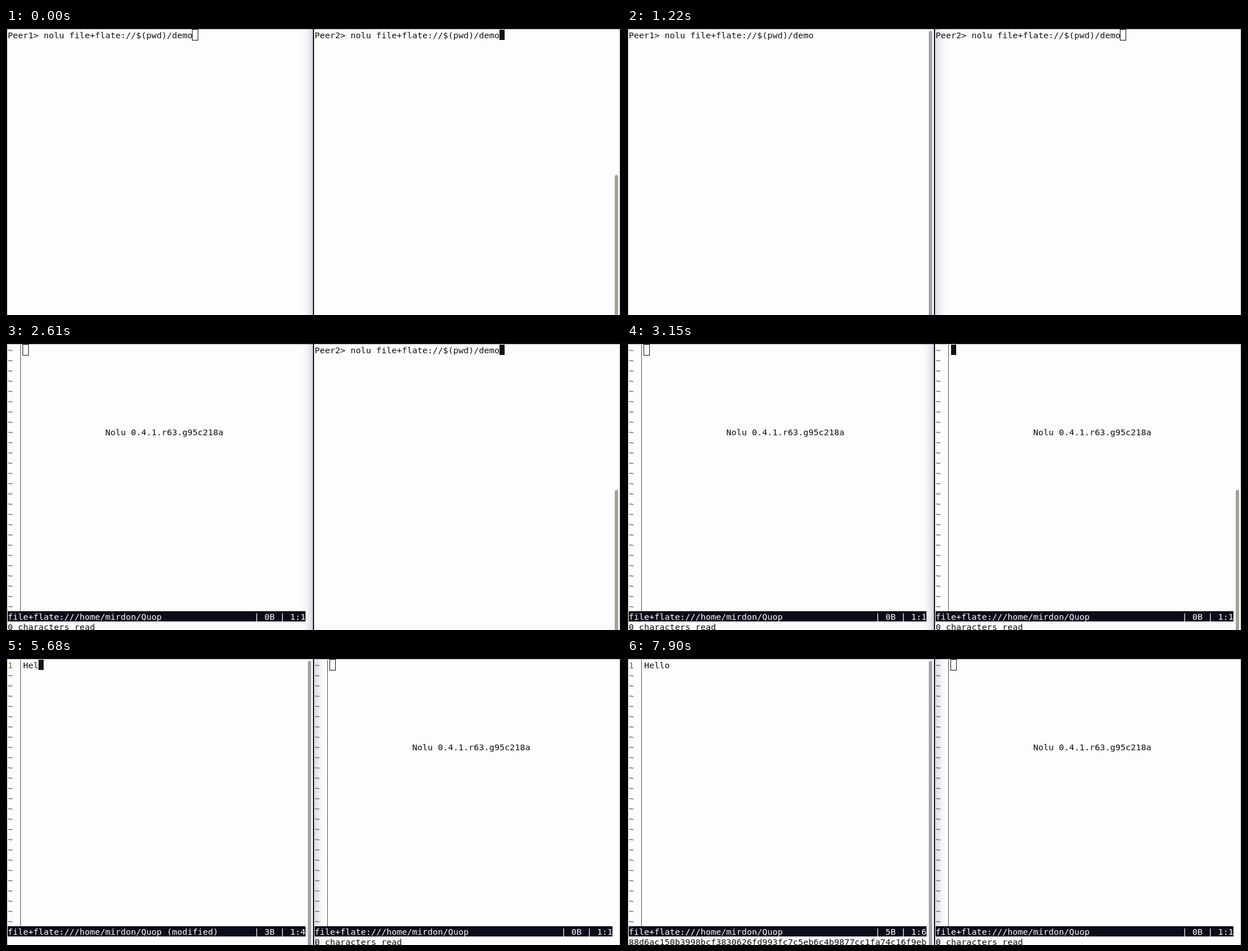
An HTML page with a canvas that plays this animation: 1078 px wide and 504 px high, repeating every 8 s.

```html
<!DOCTYPE html>
<html lang="en">
<head>
<meta charset="utf-8">
<title>Two terminals</title>
<style>
  html, body { margin: 0; width: 100%; height: 100%; overflow: hidden; background: #fdfdfd; }
  canvas { display: block; }
</style>
</head>
<body>
<canvas id="stage" width="1078" height="504"></canvas>
<script>
const ctx = document.getElementById('stage').getContext('2d');
const W = 1078, H = 504, PANE = 538, LOOP = 8000;
const CELL_W = 9, CELL_H = 18, COLS = 58, STATUS_ROW = 26;
const PAPER = '#fdfdfd', INK = '#101014', BAR = '#0b0b1a', DIM = '#50505a', NUMBER = '#77693c';

const COMMAND = 'nolu file+flate://$(pwd)/demo';
const VERSION = 'Nolu 0.4.1.r63.g95c218a';
const FILE = 'file+flate:///home/mirdon/Quop';
const HASH = '88d6ac150b3998bcf3830626fd993fc7c5eb6c4b9877cc1fa74c16f9eb';
const WORD = 'Hello';
const KEY_TIMES = [5140, 5440, 5650, 5850, 6020];
const SAVED_AT = 7340;

const panes = [
  { x: 0, prompt: 'Peer1> ', enter: 1630, open: 1660,
    hidden: [[1220, 1630], [2230, 2460], [6570, 7180], [7900, LOOP]],
    bar: { x: 529, y: 5, color: '#a3a3a9' } },
  { x: PANE, prompt: 'Peer2> ', enter: 3020, open: 3120,
    hidden: [[380, 670], [3720, 4200]],
    bar: { x: 1067, y: 258, color: '#a3a39c' } }
];

const colX = (pane, col) => pane.x + 3 + col * CELL_W;
const rowY = row => 3 + row * CELL_H;

function rect(x, y, w, h, color) {
  ctx.fillStyle = color;
  ctx.fillRect(x, y, w, h);
}

// Every glyph sits on the terminal's character grid.
function write(pane, col, row, text, color = INK) {
  ctx.fillStyle = color;
  [...text].forEach((ch, i) => ctx.fillText(ch, colX(pane, col + i), rowY(row) + 15));
}

function focusedPane(t) {
  return t < 670 || (t >= 2460 && t < 4200) ? 1 : 0;
}

// The focused window casts a soft shadow over its neighbour.
function drawShadow(focus) {
  const [edge, far] = focus ? [538, 518] : [540, 560];
  const g = ctx.createLinearGradient(edge, 0, far, 0);
  g.addColorStop(0, focus ? '#d0d0d6' : '#dcdce2');
  g.addColorStop(0.25, '#e6e6ec');
  g.addColorStop(0.6, '#f5f5f9');
  g.addColorStop(1, PAPER);
  rect(Math.min(edge, far), 2, 20, H, g);
}

function drawScrollbar({ x, y, color }) {
  ctx.fillStyle = color;
  ctx.beginPath();
  ctx.roundRect(x, y, 6, H - y + 6, 3);
  ctx.fill();
}

function drawCursor(pane, col, row, focused, t) {
  const x = colX(pane, col), y = rowY(row);
  if (!focused) {
    ctx.strokeStyle = INK;
    ctx.lineWidth = 1;
    ctx.strokeRect(x - 0.5, y - 0.5, 10, 19);
  } else if (!pane.hidden.some(([from, to]) => t >= from && t < to)) {
    rect(x, y, CELL_W, CELL_H, INK);
  }
}

function drawShell(pane, focused, t) {
  const line = pane.prompt + COMMAND;
  const entered = t >= pane.enter;
  write(pane, 0, 0, line);
  drawCursor(pane, entered ? 0 : line.length, entered ? 1 : 0, focused, t);
}

function drawEditor(pane, focused, t) {
  const typed = pane.x ? 0 : KEY_TIMES.filter(k => t >= k).length;
  const saved = typed > 0 && t >= SAVED_AT;

  for (let row = 0; row < STATUS_ROW; row++) {
    const numbered = typed && row === 0;
    write(pane, 0, row, numbered ? '1' : '~', numbered ? NUMBER : DIM);
  }
  rect(pane.x + 25, 3, 1, STATUS_ROW * CELL_H, DIM);

  if (typed) write(pane, 3, 0, WORD.slice(0, typed));
  else write(pane, 19, 8, VERSION);

  const info = `| ${typed}B | 1:${typed + 1}`;
  rect(colX(pane, 0), rowY(STATUS_ROW), COLS * CELL_W, CELL_H, BAR);
  write(pane, 0, STATUS_ROW, FILE + (typed && !saved ? ' (modified)' : ''), PAPER);
  write(pane, COLS - info.length, STATUS_ROW, info, PAPER);

  const message = saved ? HASH : typed ? '' : '0 characters read';
  write(pane, 0, STATUS_ROW + 1, message);
  drawCursor(pane, 3 + typed, 0, focused, t);
}

function draw(t) {
  const focus = focusedPane(t);
  rect(0, 0, W, H, PAPER);
  drawShadow(focus);
  drawScrollbar(panes[focus].bar);
  rect(0, 0, W, 2, INK);
  for (const x of [0, PANE, W - 2]) rect(x, 0, 2, H, INK);

  ctx.font = '14.95px "DejaVu Sans Mono", monospace';
  panes.forEach((pane, i) =>
    (t >= pane.open ? drawEditor : drawShell)(pane, i === focus, t));
}

const start = performance.now();
function tick() {
  draw((performance.now() - start) % LOOP);
  requestAnimationFrame(tick);
}
tick();
</script>
</body>
</html>
```
